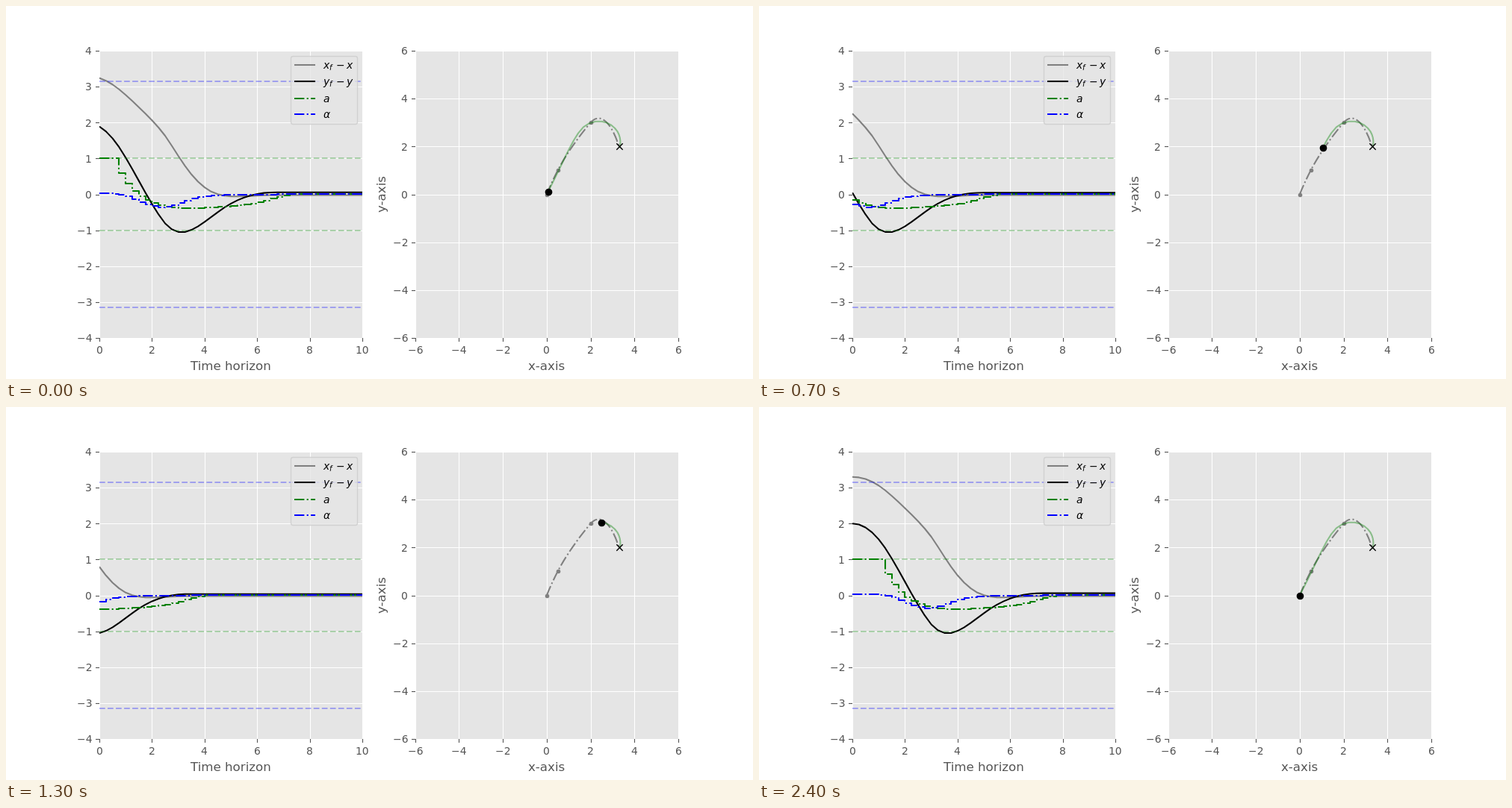
Recreate the animation shown at these times as an HTML page with a canvas. Size 1000x500 px, loop 2500 ms.

```html
<!DOCTYPE html>
<html lang="en">
<head>
<meta charset="utf-8">
<title>Receding horizon control</title>
<style>
  html, body { margin: 0; width: 100%; height: 100%; overflow: hidden; background: #fff; }
  canvas { display: block; }
</style>
</head>
<body>
<canvas id="stage" width="1000" height="500"></canvas>
<script>
const ctx = document.getElementById('stage').getContext('2d');
const LINE = 2.083, THIN = 1.39;
const DASHED = [7.7, 3.33], DASHDOT = [13.33, 3.33, 2.08, 3.33];
const TOP = 60, HEIGHT = 385, WIDTH = 352.27;
const DT = 0.25, HORIZON = 40, NODES = 70;
const GOAL = [3.3, 2];

function makeAxes(left, x0, x1, y0, y1) {
  return {
    left, x0, x1, y0, y1,
    x: v => left + (v - x0) / (x1 - x0) * WIDTH,
    y: v => TOP + (y1 - v) / (y1 - y0) * HEIGHT
  };
}
const plot = makeAxes(125, 0, 10, -4, 4);
const map = makeAxes(547.73, -6, 6, -6, 6);

// Control inputs and heading (degrees), one value per time step.
const accel = [1, 1, 1, 1, 1, .6, .3, .1, -.05, -.15, -.23, -.3, -.34, -.37, -.385, -.385, -.385,
  -.375, -.365, -.355, -.345, -.335, -.32, -.3, -.28, -.25, -.21, -.17, -.11, -.07, -.03];
const alpha = [.03, .03, .03, .03, .01, 0, -.06, -.13, -.22, -.28, -.33, -.36, -.35, -.3, -.24,
  -.18, -.12, -.08, -.05, -.03, -.025, -.01, 0, 0, 0, 0, 0, 0, 0];
const heading = [61.3, 61.3, 61.3, 61.3, 61.3, 62, 62, 62, 61.5, 59.5, 55.5, 47.5, 30.5, 14.5, .5,
  -14, -26, -38, -49, -62, -72, -81, -88, -94, -99, -104, -109, -114];
const REST = 0.003; // residual input once the vehicle has stopped

function simulate() {
  const path = [[0, 0]];
  let speed = 0;
  for (let k = 0; k < NODES; k++) {
    const next = Math.max(0, speed + (accel[k] || 0) * DT);
    const step = (speed + next) / 2 * DT;
    const angle = heading[Math.min(k, heading.length - 1)] * Math.PI / 180;
    const [x, y] = path[k];
    path.push([x + step * Math.cos(angle), y + step * Math.sin(angle)]);
    speed = next;
  }
  return path;
}
const route = simulate();

// Each new plan settles a little closer to the goal.
function planFrom(start) {
  const offset = 0.027 - 0.006 * start * DT;
  return Array.from({ length: HORIZON + 1 }, (_, i) => {
    const [x, y] = route[start + i];
    const u = Math.min(1, Math.max(0, ((start + i) * DT - 5.5) / 1.75));
    return [x, y - offset * u * u * (3 - 2 * u)];
  });
}

function stroke(color, width = LINE, dash = [], opacity = 1) {
  ctx.globalAlpha = opacity;
  ctx.strokeStyle = color;
  ctx.lineWidth = width;
  ctx.setLineDash(dash);
  ctx.stroke();
  ctx.setLineDash([]);
  ctx.globalAlpha = 1;
}

function polyline(points, ...style) {
  ctx.beginPath();
  points.forEach(([x, y]) => ctx.lineTo(x, y));
  stroke(...style);
}

const project = (axes, points) => points.map(([x, y]) => [axes.x(x), axes.y(y)]);
const pixelCenter = v => Math.round(v) + 0.5;

function curve(axes, points, ...style) {
  polyline(project(axes, points), ...style);
}

// Axis-parallel lines sit on whole pixels.
function straight(axes, points, ...style) {
  polyline(project(axes, points).map(p => p.map(Math.round)), ...style);
}

function steps(values, start, color) {
  const points = [];
  for (let i = 0; i < HORIZON; i++) {
    const v = values[start + i] ?? REST;
    points.push([i * DT, v], [(i + 1) * DT, v]);
  }
  straight(plot, points, color, LINE, DASHDOT);
}

function dot(axes, [x, y], radius, color) {
  ctx.beginPath();
  ctx.arc(pixelCenter(axes.x(x)), pixelCenter(axes.y(y)), radius, 0, 2 * Math.PI);
  ctx.fillStyle = color;
  ctx.fill();
}

function text(string, x, y, size, align = 0.5, color = '#555', style = '') {
  ctx.font = `${style} ${size}px "DejaVu Sans", sans-serif`;
  ctx.fillStyle = color;
  const left = x - align * ctx.measureText(string).width;
  ctx.fillText(string, Math.round(left), Math.round(y));
}

function drawAxes(axes, yStep) {
  const label = v => String(v).replace('-', '\u2212');
  const left = Math.round(axes.left), right = Math.round(axes.left + WIDTH);
  const bottom = TOP + HEIGHT;
  ctx.fillStyle = '#e5e5e5';
  ctx.fillRect(left, TOP, right - left, HEIGHT);
  for (let v = axes.x0; v <= axes.x1; v += 2) {
    const x = pixelCenter(axes.x(v));
    clipped(axes, () => polyline([[x, TOP], [x, bottom]], '#fff', 1.11));
    polyline([[x, bottom], [x, bottom + 5]], '#555', 1.11);
    text(label(v), axes.x(v), 466, 13.89);
  }
  for (let v = axes.y0; v <= axes.y1; v += yStep) {
    const y = pixelCenter(axes.y(v));
    clipped(axes, () => polyline([[left, y], [right, y]], '#fff', 1.11));
    polyline([[left - 5, y], [left, y]], '#555', 1.11);
    text(label(v), axes.left - 9.7, axes.y(v) + 5.3, 13.89, 1);
  }
}

function clipped(axes, draw) {
  ctx.save();
  ctx.beginPath();
  ctx.rect(Math.round(axes.left), TOP, Math.round(WIDTH), HEIGHT);
  ctx.clip();
  draw();
  ctx.restore();
}

function drawLegend() {
  ctx.beginPath();
  ctx.roundRect(381.5, 67.5, 89, 91, 2.8);
  ctx.globalAlpha = 0.8;
  ctx.fillStyle = '#e5e5e5';
  ctx.fill();
  stroke('#ccc', THIN, [], 0.8);

  const italic = (s, x, y, size = 13.89) => text(s, x, y, size, 0, '#000', 'italic');
  const sample = (baseline, color, dash) =>
    polyline([[386, baseline - 5], [414, baseline - 5]], color, LINE, dash);
  const difference = (name, y) => {
    italic(name, 425, y);
    italic('f', 433.4, y + 2, 9.72);
    text('\u2212', 447.7, y, 13.89, 0.5, '#000');
    italic(name, 456, y);
  };
  sample(84, 'gray');
  sample(106, '#000');
  sample(129, 'green', DASHDOT);
  sample(150, 'blue', DASHDOT);
  difference('x', 84);
  difference('y', 106);
  italic('a', 425, 129);
  italic('α', 425, 150);
}

function drawReference() {
  const bezier = (...p) => ctx.bezierCurveTo(...p.map((v, i) => i % 2 ? map.y(v) : map.x(v)));
  ctx.beginPath();
  ctx.moveTo(map.x(0), map.y(0));
  bezier(.15, .34, .32, .68, .5, 1);
  bezier(.95, 1.78, 1.5, 2.45, 2, 3);
  bezier(2.33, 3.36, 2.85, 3.25, ...GOAL);
  stroke('gray', LINE, DASHDOT);
  [[0, 0], [.5, 1], [2, 3]].forEach(p => dot(map, p, 2.8, 'gray'));
}

function drawGoal() {
  const x = pixelCenter(map.x(GOAL[0])), y = pixelCenter(map.y(GOAL[1])), r = 4.17;
  polyline([[x - r, y - r], [x + r, y + r]], '#000', THIN);
  polyline([[x - r, y + r], [x + r, y - r]], '#000', THIN);
}

function drawScene(start) {
  const plan = planFrom(start);
  const error = axis => plan.map((p, i) => [i * DT, GOAL[axis] - p[axis]]);
  ctx.fillStyle = '#fff';
  ctx.fillRect(0, 0, 1000, 500);
  ctx.lineJoin = 'round';

  drawAxes(plot, 1);
  text('Time horizon', 301, 488, 16.67);
  clipped(plot, () => {
    curve(plot, error(0), 'gray');
    curve(plot, error(1), '#000');
    steps(accel, start, 'green');
    steps(alpha, start, 'blue');
    for (const [limit, color] of [[1, 'green'], [Math.PI, 'blue']])
      for (const v of [limit, -limit])
        straight(plot, [[0, v], [10, v]], color, LINE, DASHED, 0.3);
  });
  drawLegend();

  drawAxes(map, 2);
  text('x-axis', 723.9, 488, 16.67);
  ctx.save();
  ctx.translate(508, 253);
  ctx.rotate(-Math.PI / 2);
  text('y-axis', 0, 0, 16.67);
  ctx.restore();
  drawReference();
  curve(map, plan, 'green', LINE, [], 0.4);
  drawGoal();
  dot(map, plan[0], 4.86, '#000');
}

// The plan restarts on the last tick, then continues from the third node.
function tick() {
  const index = Math.floor(performance.now() % 2500 / 100);
  drawScene(index === 24 ? 0 : index + 2);
  requestAnimationFrame(tick);
}
tick();
</script>
</body>
</html>
```
